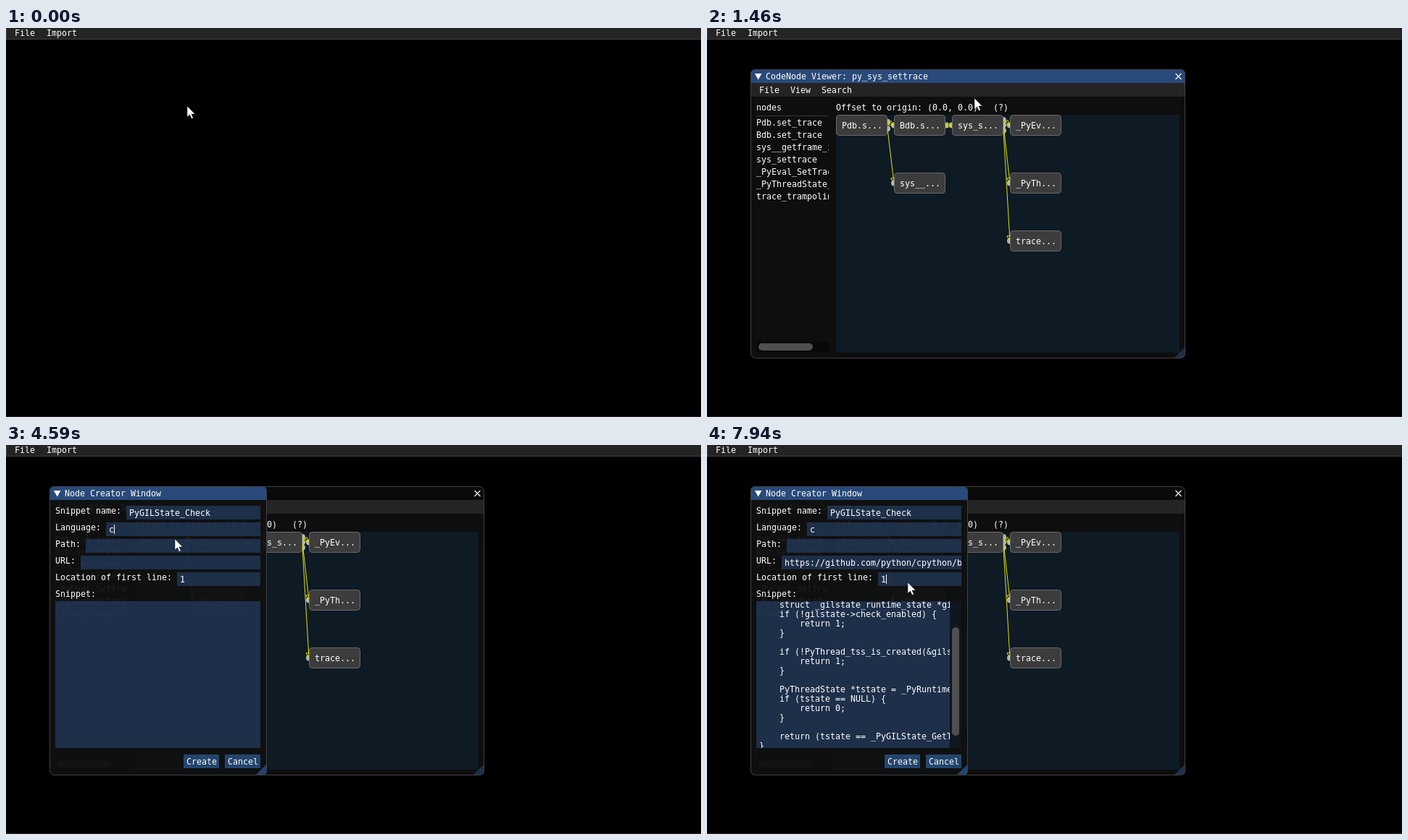
Write an HTML page that moves like this. It is 959 px wide and 538 px high and loops after 8000 ms.

```html
<!DOCTYPE html>
<html lang="en">
<head>
<meta charset="utf-8">
<title>Node creator</title>
<style>
  html, body { margin: 0; width: 100%; height: 100%; overflow: hidden; background: #000; }
  svg { display: block; width: 959px; height: 538px; }
  text { font: 11.63px "DejaVu Sans Mono", monospace; fill: #fff; white-space: pre; }
</style>
</head>
<body>
<svg id="stage" viewBox="0 0 959 538" xmlns="http://www.w3.org/2000/svg"></svg>
<script>
const LOOP = 8000, STEP = 76.7, CHAR = 7;
const NS = 'http://www.w3.org/2000/svg';
const stage = document.getElementById('stage');

const C = {
  bar: '#242424', title: '#294a7a', border: '#404045', hover: '#3c80cf',
  field: '#294a7a', button: '#23456d', dim: '#7f7f7f', grip: '#1c3149',
  canvas: '#0e1a24', node: '#3c3c3c', nodeEdge: '#6a6a6a', link: '#e0e000',
  slot: '#b4b4b4', grab: '#4f4f4f'
};

function add(parent, tag, attrs = {}) {
  const el = document.createElementNS(NS, tag);
  for (const k in attrs) el.setAttribute(k, attrs[k]);
  parent.appendChild(el);
  return el;
}
const group = (p, attrs) => add(p, 'g', attrs);
const path = (p, d, fill, more) => add(p, 'path', { d, fill, ...more });
const rect = (p, x, y, x2, y2, fill, more) =>
  add(p, 'rect', { x, y, width: x2 - x, height: y2 - y, fill, ...more });
function label(p, x, y, str, fill) {
  const el = add(p, 'text', { x, y });
  if (fill) el.style.fill = fill;
  el.textContent = str;
  return el;
}
function clipGroup(p, id, x, y, x2, y2) {
  rect(add(p, 'clipPath', { id }), x, y, x2, y2);
  return group(p, { 'clip-path': `url(#${id})` });
}
const show = (el, on) => el.setAttribute('visibility', on ? 'inherit' : 'hidden');

// Title strip with the two top corners rounded
const titlePath = (x, x2) =>
  `M${x} 76V64Q${x} 57 ${x + 7} 57H${x2 - 7}Q${x2} 57 ${x2} 64V76Z`;

function frame(p, x2) {
  rect(p, 60.5, 57.5, x2 - .5, 456.5, 'none', { rx: 7, stroke: C.border });
}
function heading(p, x2, str) {
  path(p, titlePath(60, x2), C.title);
  path(p, 'M66 63H75.5L70.7 71.5Z', '#fff');
  label(p, 81, 71, str);
}
const gripPath = x2 => `M${x2 - 16} 457L${x2} 441V450Q${x2} 457 ${x2 - 7} 457Z`;

// Main menu bar
rect(stage, 0, 0, 959, 538, '#000');
rect(stage, 0, 537, 959, 538, '#2a2226');
rect(stage, 0, 0, 959, 16, C.bar);
rect(stage, 0, 15, 959, 16, C.border);
rect(stage, 0, 0, 1, 16, C.border);
const fileHot = rect(stage, 4, 0, 47, 16, C.hover);
label(stage, 12, 11, 'File');
label(stage, 56, 11, 'Import');

// File menu
const menu = group(stage);
rect(menu, 3.5, 16.5, 173.5, 99.5, '#131313', { stroke: C.border });
const recentHot = rect(menu, 7, 57, 170, 74, C.hover);
['New Project', 'Open Project', 'Open Recent'].forEach((s, i) => label(menu, 11, 35 + 17 * i, s));
label(menu, 102, 35, 'Ctrl+N', C.dim);
label(menu, 102, 52, 'Ctrl+O', C.dim);
label(menu, 11, 90, 'Quit');
rect(menu, 7, 75, 170, 76, C.border);
path(menu, 'M157 60V69.5L166 64.7Z', '#fff');

// Viewer window
const viewer = group(stage);
rect(viewer, 60, 57, 660, 457, '#0e0e0e', { rx: 7 });
const viewerIdle = path(viewer, titlePath(60, 660), '#0a0a0a');
const viewerHead = group(viewer);
heading(viewerHead, 660, 'CodeNode Viewer: py_sys_settrace');
path(viewer, 'M646.5 63L654.5 71M654.5 63L646.5 71', 'none', { stroke: '#fff', 'stroke-width': 1.1 });
rect(viewer, 61, 76, 659, 95, C.bar);
[[72, 'File'], [115, 'View'], [158, 'Search']].forEach(([x, s]) => label(viewer, x, 90, s));
label(viewer, 68, 114, 'nodes');
rect(viewer, 68, 121, 168, 122, '#38383d');
const list = clipGroup(viewer, 'listClip', 66, 95, 168, 434);
['Pdb.set_trace', 'Bdb.set_trace', 'sys__getframe_impl', 'sys_settrace',
 '_PyEval_SetTrace', '_PyThreadState_Get', 'trace_trampoline']
  .forEach((s, i) => label(list, 68, 135 + 17 * i, s));
rect(viewer, 68, 434, 168, 448, '#080808');
rect(viewer, 71, 436, 146, 446, C.grab, { rx: 5 });
label(viewer, 178, 114, 'Offset to origin: (0.0, 0.0)   (?)');
rect(viewer, 178, 120, 652, 449, C.canvas);

// Graph: column, row, caption, indices of linked nodes
const nodes = [
  [0, 0, 'Pdb.s...', [1, 2]], [1, 0, 'Bdb.s...', [3]], [1, 1, 'sys__...', []],
  [2, 0, 'sys_s...', [4, 5, 6]], [3, 0, '_PyEv...', []], [3, 1, '_PyTh...', []],
  [3, 2, 'trace...', []]
];
const nodeX = n => 178 + 80 * n[0], nodeY = n => 120 + 80 * n[1];
const dots = group(viewer), links = group(viewer, { fill: 'none', stroke: C.link });
function link(x, y, x2, y2) {
  const len = Math.hypot(x2 - x, y2 - y), ux = (x2 - x) / len, uy = (y2 - y) / len;
  const bx = x2 - 7 * ux, by = y2 - 7 * uy, w = 3.6;
  add(links, 'path', {
    d: `M${x} ${y}L${x2} ${y2}L${bx - w * uy} ${by + w * ux}L${bx + w * uy} ${by - w * ux}L${x2} ${y2}`
  });
  for (const [cx, cy] of [[x, y], [x2, y2]]) add(dots, 'circle', { cx, cy, r: 4, fill: C.slot });
}
nodes.forEach(n => n[3].forEach((to, i, all) => {
  const end = nodes[to];
  link(nodeX(n) + 71, nodeY(n) + 29 * (i + 1) / (all.length + 1), nodeX(end), nodeY(end) + 14.5);
}));
nodes.forEach(n => {
  const x = nodeX(n), y = nodeY(n);
  rect(viewer, x + .5, y + .5, x + 70.5, y + 28.5, C.node, { rx: 4, stroke: C.nodeEdge });
  label(viewer, x + 8, y + 19, n[2]);
});
path(viewer, gripPath(660), C.grip);
frame(viewer, 660);

// Creator window
const dialog = group(stage);
rect(dialog, 60, 57, 360, 457, '#0f0f0f', { rx: 7, 'fill-opacity': .94 });
heading(dialog, 360, 'Node Creator Window');
function field(row, x, caption) {
  const y = 84 + 23 * row;
  label(dialog, 68, y + 11, caption);
  rect(dialog, x, y, 351, y + 19, C.field, { 'fill-opacity': .54 });
  const box = clipGroup(dialog, 'field' + row, x, y, 351, y + 19);
  return { x: x + 4, y, text: label(box, x + 4, y + 14, '') };
}
const name = field(0, 166, 'Snippet name:');
const lang = field(1, 138, 'Language:');
field(2, 110, 'Path:');
const url = field(3, 103, 'URL:');
const line = field(4, 236, 'Location of first line:');
line.text.textContent = '1';
const picked = rect(dialog, 170, 87, 227, 102, '#4296fa', { 'fill-opacity': .35 });

label(dialog, 68, 210, 'Snippet:');
rect(dialog, 68, 216, 351, 419, C.field, { 'fill-opacity': .54 });
const snippet = group(dialog);
const code = clipGroup(snippet, 'codeClip', 68, 216, 335, 419);
`    struct _gilstate_runtime_state *gilstate
    if (!gilstate->check_enabled) {
        return 1;
    }

    if (!PyThread_tss_is_created(&gilstate->
        return 1;
    }

    PyThreadState *tstate = _PyRuntimeGILState
    if (tstate == NULL) {
        return 0;
    }

    return (tstate == _PyGILState_GetThisThread
}`.split('\n').forEach((s, i) => label(code, 72, 225 + 13 * i, s));
rect(snippet, 335, 216, 351, 419, '#10161f');
rect(snippet, 338, 252, 348, 402, C.grab, { rx: 5 });

for (const [x, s] of [[245, 'Create'], [302, 'Cancel']]) {
  rect(dialog, x, 428, x + 49, 447, C.button);
  label(dialog, x + 4, 442, s);
}
path(dialog, gripPath(360), '#24436c');
frame(dialog, 360);
const caret = rect(dialog, 0, 0, 1, 13, '#fff');

const pointer = path(stage, 'M0 0V15.2L3.5 11.9L6 17.4L8.4 16.4L6 11H10.8Z', '#fff',
  { stroke: '#000', 'stroke-width': .5 });

// Pointer stops: time, x, y
const stops = [
  [0, 250, 108], [70, 244, 104], [450, 50, 18], [540, 38, 14], [640, 38, 14], [850, 98, 62],
  [990, 104, 64], [1200, 235, 68], [1380, 369, 97], [1480, 369, 97], [1760, 519, 147],
  [2000, 604, 169], [2150, 612, 171], [2300, 590, 169], [2370, 565, 167], [2400, 565, 167],
  [2700, 92, 86], [2900, 110, 95], [3080, 233, 79], [3150, 245, 86], [3430, 245, 86],
  [3445, 245, 91], [3560, 245, 91], [3790, 238, 113], [3960, 232, 117], [4440, 232, 117],
  [4750, 235, 163], [4990, 226, 158], [5160, 226, 158], [5600, 221, 152], [5930, 221, 152],
  [6300, 222, 157], [6690, 220, 238], [6840, 220, 246], [7230, 222, 250], [7600, 270, 182],
  [7780, 277, 190], [8000, 277, 190]
];
function pointerAt(t) {
  const i = Math.max(1, stops.findIndex(s => s[0] > t));
  const [a, x, y] = stops[i - 1], [b, x2, y2] = stops[i];
  const k = (t - a) / (b - a);
  return [Math.round(x + (x2 - x) * k), Math.round(y + (y2 - y) * k)];
}

// Caret position for the focused field
function caretAt(t) {
  const after = f => [f.x + CHAR * f.text.textContent.length, f.y + 3];
  if (t < 3480) return null;
  if (t < 4040) return after(name);
  if (t < 4900) return after(lang);
  if (t < 6300) return after(url);
  if (t < 6840) return [349, url.y + 3];
  if (t < 7230) return [72, 219];
  return t < 7860 ? null : after(line);
}

function render(t) {
  const menuOpen = t >= 530 && t < 1230;
  show(fileHot, menuOpen);
  show(menu, menuOpen);
  show(recentHot, t >= 850);
  if (!menuOpen) show(recentHot, false);

  const creating = t >= 2920;
  show(viewer, t >= 1230);
  show(viewerHead, t >= 1230 && !creating);
  show(viewerIdle, creating);
  show(dialog, creating);
  show(picked, creating && t >= 3480 && t < 3640);
  show(snippet, t >= 7230);

  name.text.textContent = t < 3640 ? 'untitled' : 'PyGILState_Check';
  lang.text.textContent = t < 4270 ? '' : 'c';
  url.text.textContent = t < 6300 ? '' : 'https://github.com/python/cpython/blob/';

  const c = caretAt(t);
  show(caret, !!c);
  if (c) {
    caret.setAttribute('x', c[0]);
    caret.setAttribute('y', c[1]);
  }

  const q = Math.min(LOOP - 1, Math.floor((t + 8) / STEP) * STEP);
  pointer.setAttribute('transform', `translate(${pointerAt(q)})`);
}

const start = performance.now();
function tick() {
  render((performance.now() - start) % LOOP);
  requestAnimationFrame(tick);
}
tick();
</script>
</body>
</html>
```
